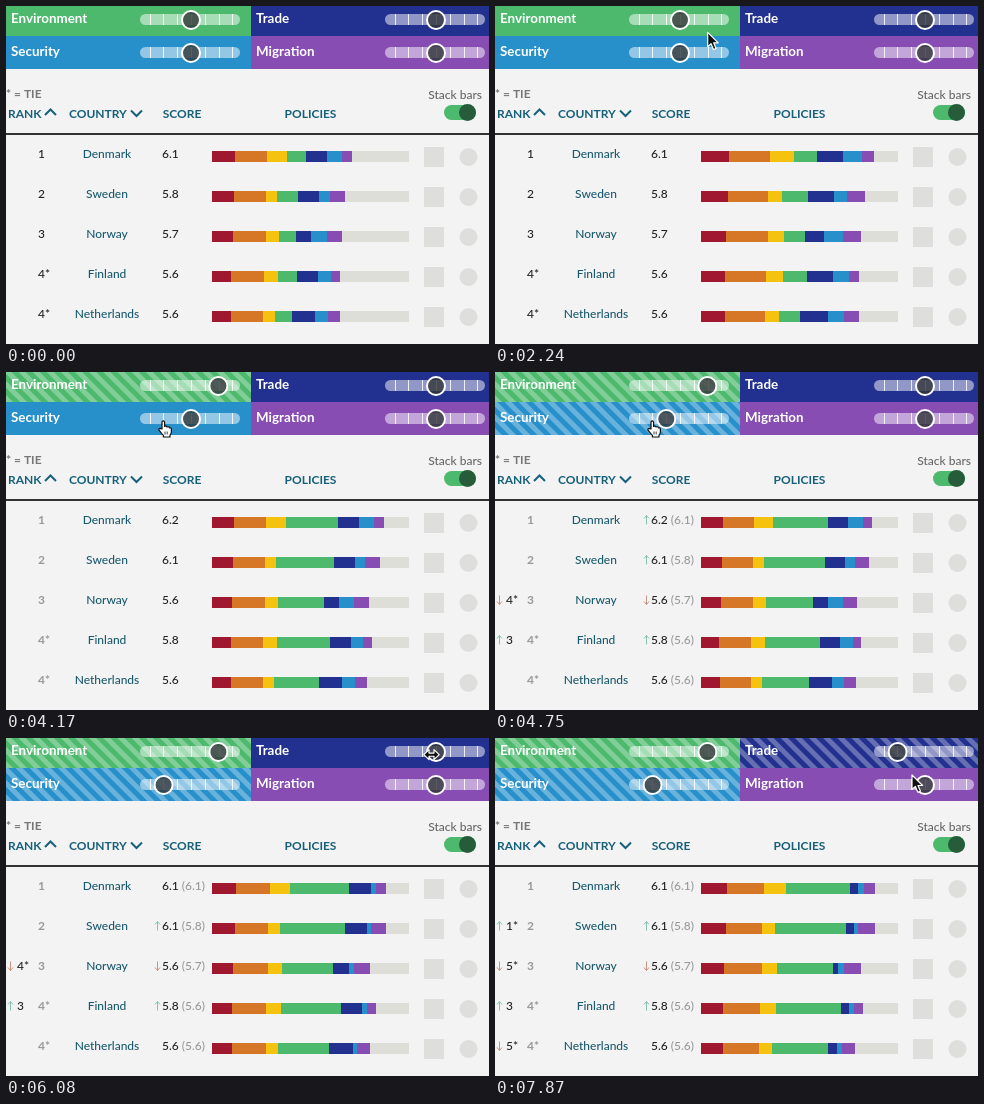
An HTML page with a canvas that plays this animation: 483 by 338 pixels, repeating every 8 s.

```html
<!DOCTYPE html>
<html lang="en">
<head>
<meta charset="utf-8">
<title>Policy weights</title>
<style>
html, body { margin: 0; width: 100%; height: 100%; overflow: hidden; background: #f3f3f3; }
canvas { display: block; width: 483px; height: 338px; }
</style>
</head>
<body>
<canvas id="stage"></canvas>
<script>
const W = 483, H = 338, LOOP = 8000, STEPS = 54;
const canvas = document.getElementById('stage');
const ctx = canvas.getContext('2d');
const ratio = window.devicePixelRatio || 1;
canvas.width = W * ratio;
canvas.height = H * ratio;

const GREEN = '#4cb96d', BLUE = '#2790cb', NAVY = '#22308f', PURPLE = '#874db3';
const TEAL = '#17607a', DARK = '#222', GRAY = '#999', UP = '#86c2b4', DOWN = '#c99482';
const COLORS = ['#a0182f', '#d67728', '#f4c20f', GREEN, NAVY, BLUE, PURPLE];
const ENV = 3, TRADE = 4, SECURITY = 5;

const ROWS = [
  { name: 'Denmark', rank: '1', scores: ['6.1', '6.2', '6.1'], ranks: ['', ''], parts: [28.3, 40.2, 24.2, 23.5, 26, 19.2, 12] },
  { name: 'Sweden', rank: '2', scores: ['5.8', '6.1', '6.1'], ranks: ['', '+1*'], parts: [27, 39.7, 14.2, 26, 26, 13, 18.2] },
  { name: 'Norway', rank: '3', scores: ['5.7', '5.6', '5.6'], ranks: ['-4*', '-5*'], parts: [25.4, 41.6, 16.4, 20.3, 18.8, 19.4, 18.5] },
  { name: 'Finland', rank: '4*', scores: ['5.6', '5.8', '5.8'], ranks: ['+3', '+3'], parts: [23.7, 41, 17, 23.8, 26, 16, 10.5] },
  { name: 'Netherlands', rank: '4*', scores: ['5.6', '5.6', '5.6'], ranks: ['', '-5*'], parts: [24, 39.7, 14.5, 20.3, 28.7, 16, 15] }
];

// step, left, top, shape
const CURSOR = [
  [9, 278, 54, 'arrow'], [10, 231, 42, 'arrow'], [11, 231, 42, 'arrow'],
  [17, 202, 17, 'hand'], [20, 202, 17, 'hand'], [21, 208, 17, 'hand'], [23, 208, 17, 'hand'],
  [28, 152, 48, 'hand'], [32, 152, 48, 'hand'], [33, 156, 42, 'resize'],
  [36, 354, 8, 'resize'], [39, 411, 8, 'resize'], [42, 420, 12, 'hand'],
  [46, 400, 12, 'hand'], [48, 396, 12, 'hand'], [51, 408, 26, 'arrow'], [53, 416, 36, 'arrow']
];

const mix = (a, b, p) => a + (b - a) * p;
const ramp = (t, from, to) => Math.min(1, Math.max(0, (t - from) / (to - from)));
const smooth = p => p * p * (3 - 2 * p);

function rect(x, y, w, h, color) {
  ctx.fillStyle = color;
  ctx.fillRect(x, y, w, h);
}

function pill(x, y, w, h, color) {
  ctx.fillStyle = color;
  ctx.beginPath();
  ctx.roundRect(x, y, w, h, h / 2);
  ctx.fill();
}

function disc(x, y, r, color) {
  ctx.fillStyle = color;
  ctx.beginPath();
  ctx.arc(x, y, r, 0, Math.PI * 2);
  ctx.fill();
}

function line(points, color, width) {
  ctx.strokeStyle = color;
  ctx.lineWidth = width;
  ctx.beginPath();
  points.forEach(([x, y]) => ctx.lineTo(x, y));
  ctx.stroke();
}

function text(str, x, y, color, { size = 12, weight = 500, align = 'left' } = {}) {
  ctx.font = `${weight} ${size}px Lato, sans-serif`;
  ctx.textAlign = align;
  ctx.fillStyle = color;
  ctx.fillText(str, x, y);
}

function smallArrow(x, y, up) {
  const color = up ? UP : DOWN;
  const tip = up ? y - 4.5 : y + 4.5, back = up ? tip + 3 : tip - 3;
  line([[x, y - 4.5], [x, y + 4.5]], color, 1);
  line([[x - 2.5, back], [x, tip], [x + 2.5, back]], color, 1);
}

function stripes(x, y, w, h) {
  const band = 5 * Math.SQRT2;
  ctx.save();
  ctx.beginPath();
  ctx.rect(x, y, w, h);
  ctx.clip();
  ctx.fillStyle = 'rgba(255,255,255,.3)';
  for (let s = 0; s < w + h; s += band * 2) {
    ctx.beginPath();
    ctx.moveTo(x + s, y + h);
    ctx.lineTo(x + s + band, y + h);
    ctx.lineTo(x + s + band - h, y);
    ctx.lineTo(x + s - h, y);
    ctx.fill();
  }
  ctx.restore();
}

function slider(label, x, y, w, h, color, value, changed) {
  rect(x, y, w, h, color);
  if (changed) stripes(x, y, w, h);
  const mid = y + h - 16, center = x + 185;
  text(label, x + 5, mid + 3, '#fff', { size: 13.4, weight: 700 });
  pill(center - 51, mid - 6, 100, 11, 'rgba(255,255,255,.5)');
  for (let i = -3; i <= 3; i++) {
    rect(Math.round(center + i * 13.8), mid - 6, 1, 11, 'rgba(255,255,255,.85)');
  }
  const knob = center + value * 13.7;
  disc(knob, mid, 9, 'rgba(50,54,56,.8)');
  ctx.strokeStyle = '#fff';
  ctx.lineWidth = 2;
  ctx.stroke();
}

function header() {
  const bold = { weight: 700 };
  text('* = TIE', 0, 92, '#777', bold);
  text('Stack bars', 476, 93, '#666', { align: 'right' });
  text('RANK', 2, 111.5, TEAL, bold);
  text('COUNTRY', 63, 111.5, TEAL, bold);
  text('SCORE', 176, 111.5, TEAL, { weight: 700, align: 'center' });
  text('POLICIES', 304.5, 111.5, TEAL, { weight: 700, align: 'center' });
  line([[39, 109], [44.5, 103.5], [50, 109]], TEAL, 2);
  line([[125, 104.5], [130.5, 110], [136, 104.5]], TEAL, 2);
  pill(438, 99, 32, 15, GREEN);
  disc(461.5, 106.5, 8.5, '#265c3a');
  rect(0, 127, W, 2, '#333');
}

function factors(weights) {
  const sum = weights.reduce((a, b) => a + b);
  return weights.map(w => w * 7 / sum);
}

function barFactors(step) {
  const weights = [1, 1, 1, 1, 1, 1, 1];
  const intro = mix(.808, 1, ramp(step, 0, 2));
  let result = factors(weights).map(f => f * intro);
  const changes = [[ENV, 3, 23, 29], [SECURITY, 1 / 3, 36, 41], [TRADE, 1 / 3, 48, 53]];
  for (const [policy, weight, from, to] of changes) {
    weights[policy] = weight;
    const next = factors(weights), p = smooth(ramp(step, from, to));
    result = result.map((f, i) => mix(f, next[i], p));
  }
  return result;
}

function drawRow(row, index, step, scale) {
  const top = 145 + index * 40, base = top + 7;
  const scoreState = step < 26 ? 0 : step < 41 ? 1 : 2;
  const score = row.scores[scoreState], first = row.scores[0];
  const dimmed = step >= 26;
  text(row.rank, 32, base, dimmed ? GRAY : DARK, { weight: dimmed ? 700 : 500 });
  text(row.name, 101, base, '#1a5a6e', { align: 'center' });
  text(score, 156, base, DARK);

  ctx.globalAlpha = ramp(step, 28, 31);
  if (ctx.globalAlpha > 0) {
    text(`(${first})`, 199, base, GRAY, { align: 'right' });
    if (score !== first) smallArrow(151.5, top + 3, score > first);
    const moved = row.ranks[step < 42 ? 0 : 1];
    if (moved) {
      smallArrow(4.5, top + 3, moved[0] === '+');
      text(moved.slice(1), 11, base, DARK);
    }
  }
  ctx.globalAlpha = 1;

  rect(206, top, 197, 11, '#deded9');
  let x = 206;
  row.parts.forEach((part, i) => {
    const end = x + part * scale[i], left = Math.round(x);
    rect(left, top, Math.round(end) - left, 11, COLORS[i]);
    x = end;
  });

  rect(418, top - 4, 20, 20, '#dededc');
  disc(462.5, top + 6, 9, '#dededc');
}

const SHAPES = {
  arrow: new Path2D('M1 1V15.5L4.4 12.4L6.8 18.2L9.4 17.1L7 11.5H11.6Z'),
  hand: new Path2D('M4 9V2.2Q4 .8 5.2 .8T6.6 2.2V6.4Q8.4 5.4 9 7Q10.8 6.2 11.4 7.8Q13.4 7.4 13.4 9.4V12Q13.2 14 12 15.2V17H5.4V15.4Q3.6 13.6 1 10.2Q.6 8.4 2.2 8.4Z'),
  resize: new Path2D('M.8 6L6 1V4.4H11V1L16.2 6L11 11V7.6H6V11Z')
};

function drawCursor(step) {
  if (step < CURSOR[0][0]) return;
  let i = 0;
  while (i < CURSOR.length - 1 && CURSOR[i + 1][0] <= step) i++;
  const a = CURSOR[i], b = CURSOR[i + 1] || a;
  const p = a === b ? 0 : ramp(step, a[0], b[0]);
  const shape = SHAPES[a[3]], isHand = a[3] === 'hand';
  ctx.save();
  ctx.translate(mix(a[1], b[1], p), mix(a[2], b[2], p));
  ctx.lineJoin = 'round';
  ctx.lineWidth = 1.2;
  ctx.fillStyle = isHand ? '#fff' : '#111';
  ctx.strokeStyle = isHand ? '#111' : '#fff';
  ctx.fill(shape);
  ctx.stroke(shape);
  if (isHand) {
    line([[7, 11.5], [7, 14.5]], '#111', .8);
    line([[9.2, 11.5], [9.2, 14.5]], '#111', .8);
  }
  ctx.restore();
}

function draw(time) {
  const step = Math.floor((time % LOOP) / LOOP * STEPS);
  ctx.setTransform(ratio, 0, 0, ratio, 0, 0);
  rect(0, 0, W, H, '#f3f3f3');
  const env = step < 21 ? 0 : step < 22 ? 1 : 2;
  const security = step < 32 ? 0 : step < 33 ? -1 : -2;
  const trade = step < 46 ? 0 : step < 47 ? -.08 : -2;
  slider('Environment', 0, 0, 245, 30, GREEN, env, step >= 21);
  slider('Trade', 245, 0, 238, 30, NAVY, trade, step >= 47);
  slider('Security', 0, 30, 245, 33, BLUE, security, step >= 32);
  slider('Migration', 245, 30, 238, 33, PURPLE, 0, false);
  header();
  const scale = barFactors(step);
  ROWS.forEach((row, i) => drawRow(row, i, step, scale));
  drawCursor(step);
}

let start;
function tick(now) {
  if (start === undefined) start = now;
  draw(now - start);
  requestAnimationFrame(tick);
}
draw(0);
requestAnimationFrame(tick);
</script>
</body>
</html>
```
